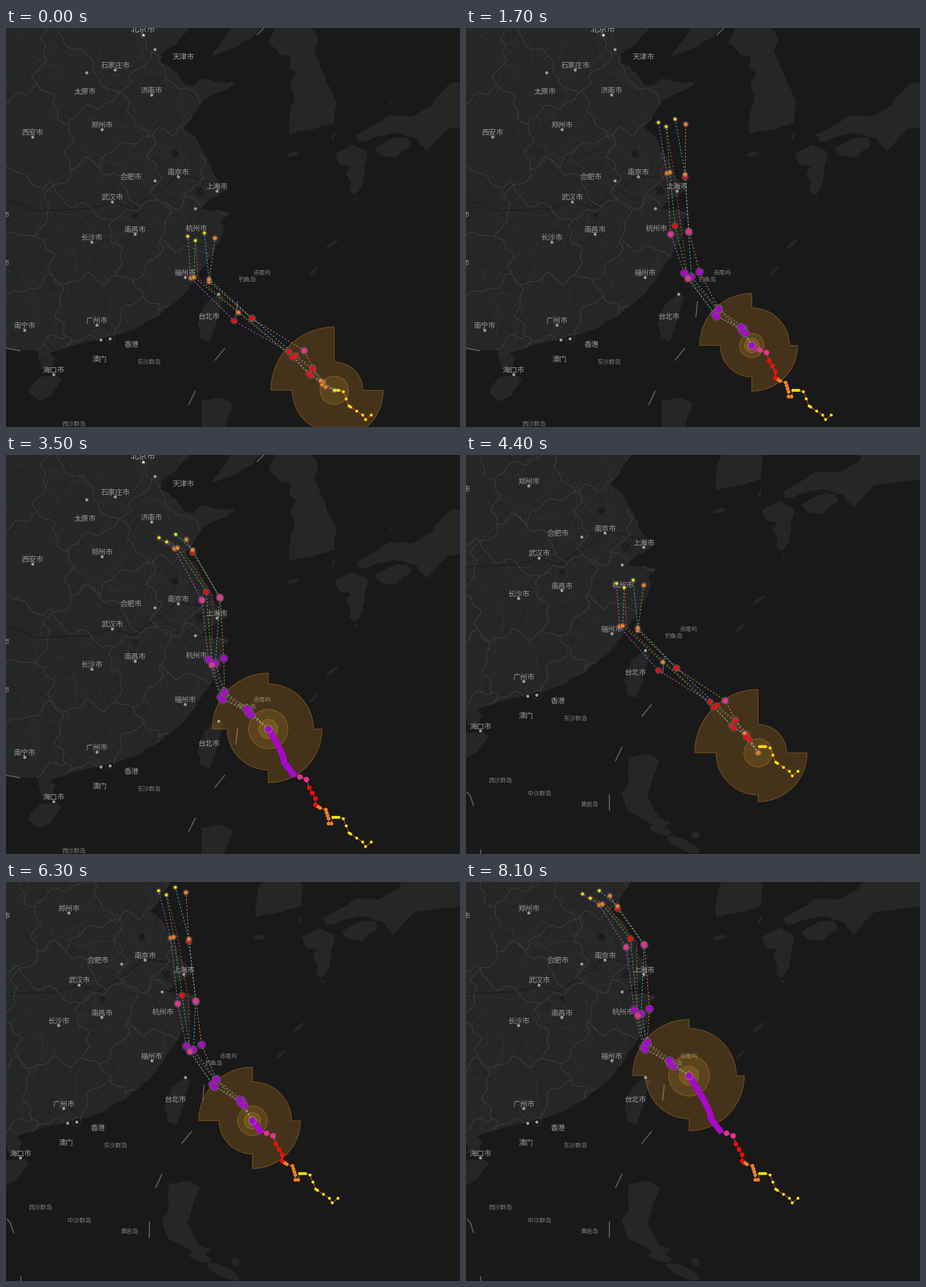
A matplotlib script that plays this animation: 798x702 px, repeating every 8.2 s.

```python
import numpy as np
import matplotlib.pyplot as plt
from matplotlib.animation import FuncAnimation
from matplotlib.collections import LineCollection
from matplotlib.patches import Circle, Ellipse, Polygon

W, H, DPI = 798, 702, 100
PX = 72 / DPI
FRAMES, RESTART = 82, 41
FIRST_STEP, SECOND_STEP = 11, 10
PAN = np.array([58.5, 124.5])
SEA, LAND = "#19191a", "#262626"
LEVELS = ["none", "#f2e205", "#ee8022", "#f50a0a", "#e0358f", "#a908cc"]

plt.rcParams["font.family"] = ["Noto Sans CJK JP"]
fig = plt.figure(figsize=(W / DPI, H / DPI), dpi=DPI, facecolor=SEA)
ax = fig.add_axes([0, 0, 1, 1])
ax.axis("off")
ax.set_xlim(0, W)
ax.set_ylim(H, 0)
rng = np.random.default_rng(7)


def rough(points, amp=1.6, parts=5):
    """Break a polyline into short wobbly steps."""
    points = np.array(points, float)
    knots = np.arange(len(points))
    fine = np.linspace(0, len(points) - 1, (len(points) - 1) * parts + 1)
    line = np.column_stack([np.interp(fine, knots, axis) for axis in points.T])
    return line + rng.normal(0, amp * 0.6, line.shape) * (fine % 1 > 0)[:, None]


# ---- land: a few key points per coast, roughened ---------------------------
BOHAI = [(-9, -9), (330, -9), (300, 28), (273, 45), (272, 60), (300, 78), (313, 100),
         (328, 102), (342, 89), (375, 95), (402, 97), (385, 110), (352, 123), (333, 147)]
EAST_SEA = [(313, 176), (336, 196), (357, 238), (368, 262), (390, 284), (355, 304),
            (341, 317), (395, 325), (380, 338), (384, 355), (365, 395), (335, 440)]
SOUTH_SEA = [(312, 470), (275, 500), (228, 530), (172, 545), (120, 558), (77, 572),
             (86, 580), (81, 602), (61, 599), (55, 567), (20, 567), (-9, 562)]
LIAODONG = [(362, 48), (395, 38), (435, 15), (455, -9), (402, -9), (380, 24)]
KOREA = [(478, -9), (461, 27), (485, 48), (500, 50), (498, 68), (510, 80), (500, 100),
         (507, 118), (497, 165), (498, 187), (545, 177), (576, 167), (580, 130),
         (556, 75), (541, 42), (549, 18), (533, -9)]
HONSHU = [(615, 187), (640, 175), (672, 155), (715, 155), (750, 135), (752, 125),
          (785, 96), (865, 90), (865, 165), (775, 178), (740, 217), (722, 195),
          (680, 185), (622, 200)]
SHIKOKU = [(648, 212), (675, 196), (706, 192), (712, 205), (685, 228), (660, 225)]
KYUSHU = [(578, 222), (608, 205), (636, 220), (625, 280), (612, 294), (603, 285),
          (605, 268), (598, 256), (606, 244), (585, 238)]
TAIWAN = [(374, 469), (383, 474), (358, 552), (342, 545), (336, 520), (350, 485)]
HAINAN = [(42, 632), (60, 614), (90, 612), (98, 620), (80, 647), (60, 657), (41, 645)]
LUZON = [(344, 655), (384, 652), (398, 662), (377, 725), (399, 765), (418, 770),
         (404, 785), (344, 752), (332, 720), (344, 700)]
# x, y, width, height, angle
ISLETS = [(504, 222, 22, 8, -12), (573, 380, 26, 6, -38), (541, 428, 22, 5, -45),
          (575, 191, 16, 4, -72), (677, 131, 4, 4, 0), (616, 300, 6, 4, -40),
          (400, 785, 40, 14, 15), (440, 810, 62, 18, 25), (462, 793, 14, 14, 0)]


def add_land(points):
    return ax.add_patch(Polygon(rough(points + points[:1]), fc=LAND, zorder=1))


mainland = add_land(BOHAI + EAST_SEA + SOUTH_SEA)
for coast in (LIAODONG, KOREA, HONSHU, SHIKOKU, KYUSHU, TAIWAN, HAINAN, LUZON):
    add_land(coast)
for x, y, w, h, angle in ISLETS:
    ax.add_patch(Ellipse((x, y), w, h, angle=angle, fc=LAND, zorder=1))
for lake, r in [((340, 287), 8), ((297, 222), 6), ((228, 331), 5)]:
    turn = np.linspace(0, 2 * np.pi, 10)
    ring = lake + r * np.column_stack([np.cos(turn), np.sin(turn)])
    ax.add_patch(Polygon(rough(ring, 2, 2), fc="#1b1b1c", zorder=2))

# ---- cities: the dot sits under the label unless given -----------------------
CITIES = [
    ("天津市", (312, 50), (262, 38)), ("石家庄市", (192, 65)),
    ("太原市", (139, 111), (142, 79)), ("济南市", (256, 109)),
    ("郑州市", (169, 170)), ("西安市", (47, 183)), ("南京市", (303, 253)),
    ("合肥市", (220, 261), (262, 269)), ("上海市", (371, 278)),
    ("武汉市", (187, 297)), ("杭州市", (335, 352), (333, 318)),
    ("南昌市", (227, 354)), ("长沙市", (151, 368)), ("福州市", (315, 430)),
    ("台北市", (356, 507), (374, 468.5)), ("南宁市", (33, 523)),
    ("广州市", (160, 514)), ("香港", (220, 556), (183, 547)),
    ("澳门", (164, 582), (167, 549)), ("海口市", (84, 601))]
ISLANDS = [("赤尾屿", (450, 430)), ("钓鱼岛", (424, 443)), ("东沙群岛", (251, 587)),
           ("西沙群岛", (119, 696)), ("中沙群岛", (187.5, 719.5)), ("黄岩岛", (275.5, 738))]


def label(text, pos, size=12.9, color="#9c9c9c"):
    ax.text(*pos, text, size=size * PX, color=color, ha="center", va="center_baseline",
            clip_on=True, zorder=4)


for name, (x, y), *dot in CITIES:
    label(name, (x, y))
    ax.add_patch(Circle(dot[0] if dot else (x, y + 9), 2.7, fc="#9a9a9a", zorder=3))
for name, pos in ISLANDS:
    label(name, pos, 10.5, "#7c7c7c")
label("北京市", (241, 2), 14.8)
ax.plot(240.5, 11.5, "*", ms=6, mfc="#eeeeee", mec="none", zorder=4)
for y in (328, 413):
    label("市", (0, y), 11)
ax.add_patch(Circle((183, 546), 8, fill=False, ec="#606060", lw=0.7, ls=":", zorder=3))


# ---- roads and borders ---------------------------------------------------------
def add_lines(lines, color, width, clip=None):
    group = LineCollection(lines, colors=color, linewidths=width * PX, zorder=2)
    ax.add_collection(group, autolim=False)
    group.set_clip_path(clip)


def road(length=34):
    heading = rng.uniform(0, 2 * np.pi) + np.cumsum(rng.normal(0, 0.22, length))
    steps = 6 * np.column_stack([np.cos(heading), np.sin(heading)])
    return rng.uniform((0, 0), (390, 560)) + np.cumsum(steps, axis=0)


def add_borders():
    """Split the mainland halfway between cities, on a warped grid."""
    x, y = np.meshgrid(np.arange(0, 400, 3), np.arange(0, 600, 3))
    wx = x + 7 * np.sin(y / 11) + 4 * np.sin(y / 5 + x / 13)
    wy = y + 7 * np.sin(x / 10) + 4 * np.sin(x / 6 - y / 15)
    seats = np.array([city[1] for city in CITIES] + [(-30, 70), (-20, 328), (-10, 413)])
    dist = np.hypot(wx - seats[:, :1, None], wy - seats[:, 1:, None])
    for k in range(len(seats)):
        gap = dist[k] - np.delete(dist, k, axis=0).min(axis=0)
        lines = ax.contour(x, y, gap, [0], colors="#3a3a3a", linewidths=1.2 * PX, zorder=2)
        lines.set_clip_path(mainland)


add_lines([road() for _ in range(120)], "#2d3131", 0.9, mainland)
YANGTZE = [(0, 300), (60, 322), (150, 318), (187, 303), (220, 318), (270, 285), (300, 258), (382, 276)]
add_lines([rough(YANGTZE)], "#1b1b1c", 1.5, mainland)
add_borders()
SEA_DASHES = [[(407, 481), (404, 509)], [(385, 563), (367, 585)], [(333, 638), (321, 663)],
              [(310.5, 721), (310.5, 750)], [(60, 717), (66, 724), (72, 742)],
              [(84.5, 818), (84.5, 830)], [(441, 12), (455, -2)], [(-2, 563), (25, 568)]]
add_lines(SEA_DASHES, "#5c5c5c", 2)

# ---- storm ------------------------------------------------------------------------
# step, x, y; the eye moves evenly between these
TRACK = np.array([
    (0, 642, 681), (1, 632, 689), (2, 627, 681), (4, 606, 667), (5, 603, 665),
    (7, 593, 640), (8, 585, 637.5), (12, 574.5, 637.5), (13, 572, 648.5),
    (14, 567, 648.5), (15, 567, 640), (18, 562, 624), (19, 552, 621),
    (21, 544, 615.5), (22, 544, 604.5), (24, 533, 585.5), (25, 528, 571),
    (27, 505, 562), (33, 489, 541), (36, 487, 530), (40, 476.5, 507.5), (51, 448, 461)])
LEVEL_STARTS = [13, 21, 25, 27]

# radii: NE, SE, SW, NW, inner ring, core
WIND_STEPS = [13, 21, 36, 50]
WIND = [(50, 86, 74, 111.5, 25, 0), (62, 74, 49.5, 87, 13, 10),
        (71, 88, 62, 97, 31, 16), (83, 97, 76, 99, 36, 17)]

# consensus forecast path at a few steps; each agency fans out from it
PATH_STEPS = [12, 22, 36, 40, 50]
PATHS = [
    [(555, 629), (541, 605), (508, 575), (418, 506), (342, 440), (340, 366)],
    [(506, 563), (470, 535), (407, 464), (376, 390), (378, 305), (376, 205)],
    [(457, 497), (414, 456), (378, 400), (378, 305), (360, 190), (336, 113)],
    [(437, 468), (397, 441), (369, 380), (368, 270), (318, 165), (298, 145)],
    [(417, 447), (379, 413), (365, 355), (357, 230), (310, 165), (284, 145)]]
# colour, sideways drift at the end, level bias, shows dots
AGENCIES = [("#f0963c", 20, 0.3, True), ("#de62ec", -18, 0, True),
            ("#3fd0e6", 9, 0, True), ("#3fe04c", -12, -0.4, True),
            ("#e04444", 0, 0, False)]
LEAD = np.linspace(1 / 6, 1, 6)
SCATTER = rng.normal(0, 4, (len(AGENCIES), 6, 2))


def at(step, steps, table):
    """Interpolate every entry of the table at the given step."""
    table = np.array(table, float)
    flat = table.reshape(len(steps), -1)
    return np.array([np.interp(step, steps, c) for c in flat.T]).reshape(table.shape[1:])


def eye_at(step):
    return at(step, TRACK[:, 0], TRACK[:, 1:])


def track_level(step):
    return 1 + np.searchsorted(LEVEL_STARTS, step, side="right")


def dot_radius(level):
    return 1.85 + 0.75 * np.asarray(level)


def forecast_levels(step, bias):
    """Strengthen towards a peak at sea, then fade over land."""
    now = track_level(step)
    level = np.interp(LEAD, [0, 0.45, 1], [now, max(now, 3.6), 1.2]) + bias
    return np.clip(np.rint(level), 1, 5).astype(int)


def wind_outline(eye, radii):
    turn = np.radians(np.arange(-90, 270, 2))
    r = np.repeat(radii, 45)
    outline = eye + np.column_stack([np.cos(turn), np.sin(turn)]) * r[:, None]
    corner = np.radians(np.arange(0, 360, 90))
    ends = eye + np.column_stack([np.cos(corner), np.sin(corner)]) * np.array(radii)[:, None]
    return np.vstack([np.vstack([outline[45 * q:45 * q + 45], ends[q]]) for q in range(4)])


moving = []


def patch(shape):
    moving.append(ax.add_patch(shape))


def line(points, color, zorder, **style):
    moving.extend(ax.plot(*points.T, color=color, zorder=zorder, **style))


def dots(points, radius, colors, zorder, alpha=1):
    moving.append(ax.scatter(*points.T, s=(2 * radius * PX) ** 2, c=colors, lw=0,
                             alpha=alpha, zorder=zorder))


def draw_wind(step, eye):
    radii = at(step, WIND_STEPS, WIND)
    edge = (0.85, 0.55, 0.08, 0.5)
    patch(Polygon(wind_outline(eye, radii[:4]), fc=(1, 0.65, 0.12, 0.19), ec=edge, lw=PX, zorder=5))
    for r, alpha in zip(radii[4:], (0.12, 0.15)):
        patch(Circle(eye, r, fc=(1, 0.75, 0.25, alpha), ec=edge, lw=PX, zorder=6))


def draw_forecasts(step, eye):
    consensus = at(step, PATH_STEPS, PATHS)
    for (color, drift, bias, dotted), scatter in zip(AGENCIES, SCATTER):
        nodes = consensus + scatter
        nodes[:, 0] += drift * LEAD
        line(np.vstack([eye, nodes]), color, 8, lw=PX, ls=(0, (3, 3)))
        if dotted:
            levels = forecast_levels(step, bias)
            radius = dot_radius(levels)
            dots(nodes, radius + 2.2, "#606060", 9, alpha=0.55)
            dots(nodes, radius, [LEVELS[k] for k in levels], 9)


def draw_track(step, eye):
    steps = np.arange(step + 1)
    past = np.array([eye_at(s) for s in steps])
    levels = track_level(steps)
    line(past, "#e8502c", 10, lw=1.1 * PX)
    dots(past, dot_radius(levels), [LEVELS[k] for k in levels], 11)
    patch(Circle(eye, dot_radius(levels[-1]) + 1.2, fill=False, ec="#9a8f86",
                 lw=1.4 * PX, alpha=0.7, zorder=12))


def draw(frame):
    while moving:
        moving.pop().remove()
    panned = frame >= RESTART
    left, top = PAN * panned
    ax.set_xlim(left, left + W)
    ax.set_ylim(top + H, top)
    step = frame - RESTART + SECOND_STEP if panned else frame + FIRST_STEP
    eye = eye_at(step)
    draw_wind(step, eye)
    draw_forecasts(step, eye)
    draw_track(step, eye)
    return moving


anim = FuncAnimation(fig, draw, frames=FRAMES, interval=100, init_func=lambda: [],
                     repeat=True, repeat_delay=0, blit=False)
plt.show()
```
